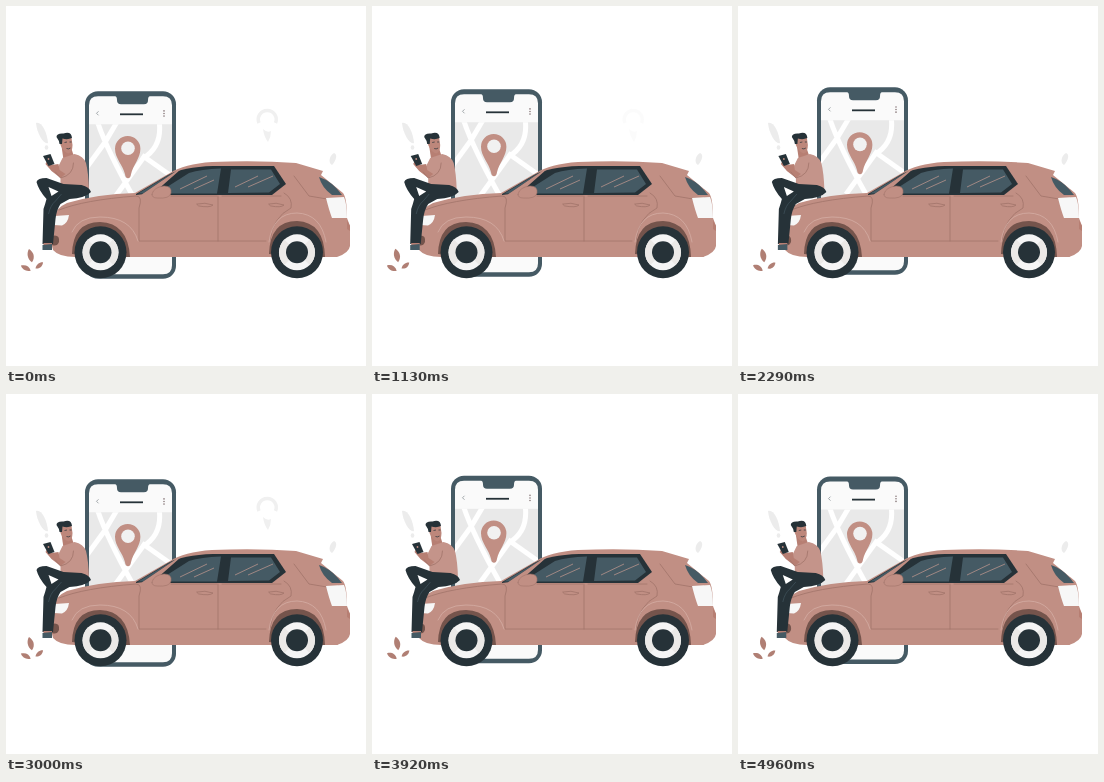
An HTML page for the animation above (5 s loop, 360 by 360 pixels).

```html
<!DOCTYPE html>
<html lang="en">
<head>
<meta charset="utf-8">
<title>Waiting by the car</title>
<style>
  html, body { margin: 0; width: 100%; height: 100%; overflow: hidden; background: #fff; }
  svg { display: block; width: 100vw; height: 100vh; }
  .pink { fill: #c18f84; }
  .skin { fill: #b77f73; }
  .brown { fill: #75544c; }
  .slate { fill: #455a64; }
  .ink { fill: #263238; }
  .pale { fill: #ececec; }
  .seam, .glow { fill: none; stroke: #a1746a; stroke-width: .8; stroke-linecap: round; stroke-linejoin: round; }
  .glow { stroke: #d5aea5; }
  .shine { fill: none; stroke: #b7948c; stroke-width: .8; }
  .road { fill: none; stroke: #fff; stroke-width: 5; }
</style>
</head>
<body>
<svg viewBox="0 0 360 360">
  <defs>
    <clipPath id="map"><rect x="83" y="118" width="83" height="110"/></clipPath>
    <g id="wheel">
      <circle r="26" class="ink"/>
      <circle r="18" fill="#f5f5f5"/>
      <path d="M-12.7-12.7A18 18 0 0 0-12.7 12.7L-7 7V-7ZM12.7-12.7A18 18 0 0 1 12.7 12.7L7 7V-7Z" fill="#ebe9e7"/>
      <circle r="11" class="ink"/>
    </g>
    <path id="leaf" d="M0 6.5C-4 3-4-3-1-6.5C3-3 4 2 0 6.5Z"/>
  </defs>

  <!-- pale background marks -->
  <g id="farPin">
    <path d="M253 117A9 9 0 1 1 269.500 117" fill="none" stroke="#f0f0f0" stroke-width="3.500"/>
    <path d="M257 123Q261 127 265 125Q265 131 262 136Q258 131 257 123Z" fill="#f0f0f0"/>
  </g>
  <g class="pale">
    <path d="M30 117C35 115 41 125 42 137C38 139 31 128 30 117Z"/>
    <ellipse cx="40.500" cy="141.500" rx="1.800" ry="2.300"/>
    <path d="M328 147C332 148 330 155 326 159C322 157 323 150 328 147Z"/>
  </g>

  <g id="phone">
    <rect x="79" y="85" width="91" height="187.500" rx="13" class="slate"/>
    <path d="M92 90H109Q111 90 111 94Q111 98 115 98H138Q142 98 142 94Q142 90 144 90H157Q166 90 166 99V259Q166 268 157 268H92Q83 268 83 259V99Q83 90 92 90Z" fill="#fafafa"/>
    <g clip-path="url(#map)">
      <rect x="83" y="117" width="83" height="110" fill="#e9e9e9"/>
      <path class="road" d="M80 162L99 136L112 114M91 114Q99 140 128 192M153 114Q157 140 137 152L108 192M136 149L170 173"/>
    </g>
    <path d="M114 108H137" stroke="#263238" stroke-width="1.800"/>
    <path d="M92.500 105L90.500 107L92.500 109" fill="none" stroke="#8b9296" stroke-width=".8"/>
    <g fill="#8a7a7c"><circle cx="158" cy="104.600" r=".8"/><circle cx="158" cy="107.200" r=".8"/><circle cx="158" cy="109.800" r=".8"/></g>
    <path class="pink" d="M122 172Q119.500 172 119 168C117 159 109 152 109 142.500A12.700 12.700 0 0 1 134.400 142.500C134.400 152 127 159 125 168Q124.500 172 122 172Z"/>
    <circle cx="122" cy="142" r="6.800" fill="#f1f1f1"/>
  </g>

  <g id="car">
    <path class="pink" d="M48 211Q50 202 61 197Q91 188 129 187L164 167Q178 158 206 156Q251 154 290 157L317 165L315 169L337 187Q341 192 341 212L344 220V240Q343 247 331 251H69Q53 251 47 244L45 236Z"/>
    <path class="ink" d="M130 188L162 169Q177 161 207 160H268L280 178L266 189H130Z"/>
    <path class="slate" d="M132 187.500L163 169L171 164.500L137 187.500ZM165 187.500L161 181L183 167Q195 163 215 162.500L211 187.500ZM222 187L225 163.500H265L274 178L263 186.500Z"/>
    <path class="pink" d="M130 189L136 188.300L171 164.500L174.500 163.500L145 189.500Z"/>
    <path class="slate" d="M313 171Q326 175 336 189H326Q316 182 313 171Z"/>
    <path class="shine" d="M174 183L201 170M188 183L208 174M229 181L252 170M242 181L267 170"/>
    <path class="pink" d="M146 188Q148 181 158 180Q166 180 165 187Q164 193 151 192Q146 192 146 188Z" stroke="#a1746a" stroke-width=".6"/>
    <path class="seam" d="M53 204Q78 194 130 190Q137 190 133 202V235H260M212 190V235M278 187Q287 192 285 202Q267 211 264 234M165 190H211M216 190H275M288 170L303 190L321 193"/>
    <path class="glow" d="M66 226Q72 211 94 211Q125 211 132 235M263 236Q267 207 291 207Q315 208 320 236"/>
    <path class="seam" d="M191 198Q199 196 207 199Q204 202 193 200ZM263 198Q270 196 278 199Q275 202 265 200Z"/>
    <path fill="#f7f7f7" d="M49 210L63 209Q62 217 56 219.500L48 219ZM320 192L338 191Q341 198 341 212L326 212Q323 204 320 192Z"/>
    <path class="brown" d="M46 230Q54 228 53 236Q51 241 46 239ZM66 248Q67 216 94 216Q122 217 124 251H94ZM263 248Q264 215 291 215Q318 216 319 251H291Z"/>
    <path class="skin" d="M341 214L344 220V225L341 223Z"/>
    <use href="#wheel" x="94.500" y="246.300"/>
    <use href="#wheel" x="291" y="246.300"/>
  </g>

  <g id="man">
    <path class="skin" d="M56 140L66 143L69 152L58 154Z"/>
    <path fill="#bd877b" d="M54 133Q60 128 66 132L67 139Q67 146 63 147.500Q58 146 55 139Z"/>
    <path class="ink" d="M51 131Q51 127 58 127.500Q66 125 66.500 132Q62 134 57 132.500L56.500 138L54 138Q54 135 51 131Z"/>
    <path d="M59 136.500L61.500 136M64 136L66 136M61 142.500Q63 143.500 65 142" stroke="#263238" stroke-width=".7" fill="none"/>
    <path fill="#c4948a" d="M57 152L69 148Q78 150 80.500 157Q83 167 83.500 184L55 181L55 172L51 164Z"/>
    <path class="skin" d="M53 158L46 159L42 154L40 158L46 165L55 172L60 168L54 164Z"/>
    <path class="seam" d="M68 157Q68 169 55 172L50 166"/>
    <path class="ink" d="M37.500 150L45 148L49 158L43 160Z"/>
    <circle cx="43" cy="153" r=".9" class="pink"/>
    <path class="ink" fill-rule="evenodd" d="M31 176Q32 172 41 172L58 178L76 179Q84 181 85.500 186Q80 192 64 193L55 198Q51 204 50 213L47.500 238H37L38 203Q40 197 41 193Q33 184 31 176ZM43 181L53 185.500L46 190Z"/>
    <path d="M56 188L50 195Q45 199 43 208" fill="none" stroke="#455a64" stroke-width=".6"/>
    <path class="skin" d="M38 237H46.500V240H38Z"/>
    <path class="slate" d="M37 239L46.500 238V244H37Z"/>
  </g>

  <g id="leaves" fill="#b07f74">
    <use href="#leaf" transform="translate(25 249.500) rotate(-8) scale(1.050)"/>
    <use href="#leaf" transform="translate(20 261.800) rotate(-58) scale(.85)"/>
    <use href="#leaf" transform="translate(33.500 259.700) rotate(55) scale(.75)"/>
  </g>
</svg>
<script>
  const LOOP = 5000, SWAY = 1500, STEP = 1000 / 24;
  const part = id => document.getElementById(id);
  const [phone, man, farPin, leaves] = ['phone', 'man', 'farPin', 'leaves'].map(part);

  function draw(ms) {
    const time = Math.floor(((ms % LOOP) + 2) / STEP) * STEP;
    const swing = (1 - Math.cos(2 * Math.PI * time / SWAY)) / 2;
    phone.setAttribute('transform', `translate(0 ${0.3 - 4 * swing})`);
    man.setAttribute('transform', `translate(${3.4 * swing - 0.5} 0)`);
    farPin.setAttribute('opacity', Math.max(0, 1 - 1.5 * swing));
    leaves.setAttribute('transform', `rotate(${2 * swing} 27 266)`);
  }

  const start = performance.now();
  function tick() {
    draw(performance.now() - start);
    requestAnimationFrame(tick);
  }
  tick();
</script>
</body>
</html>
```
